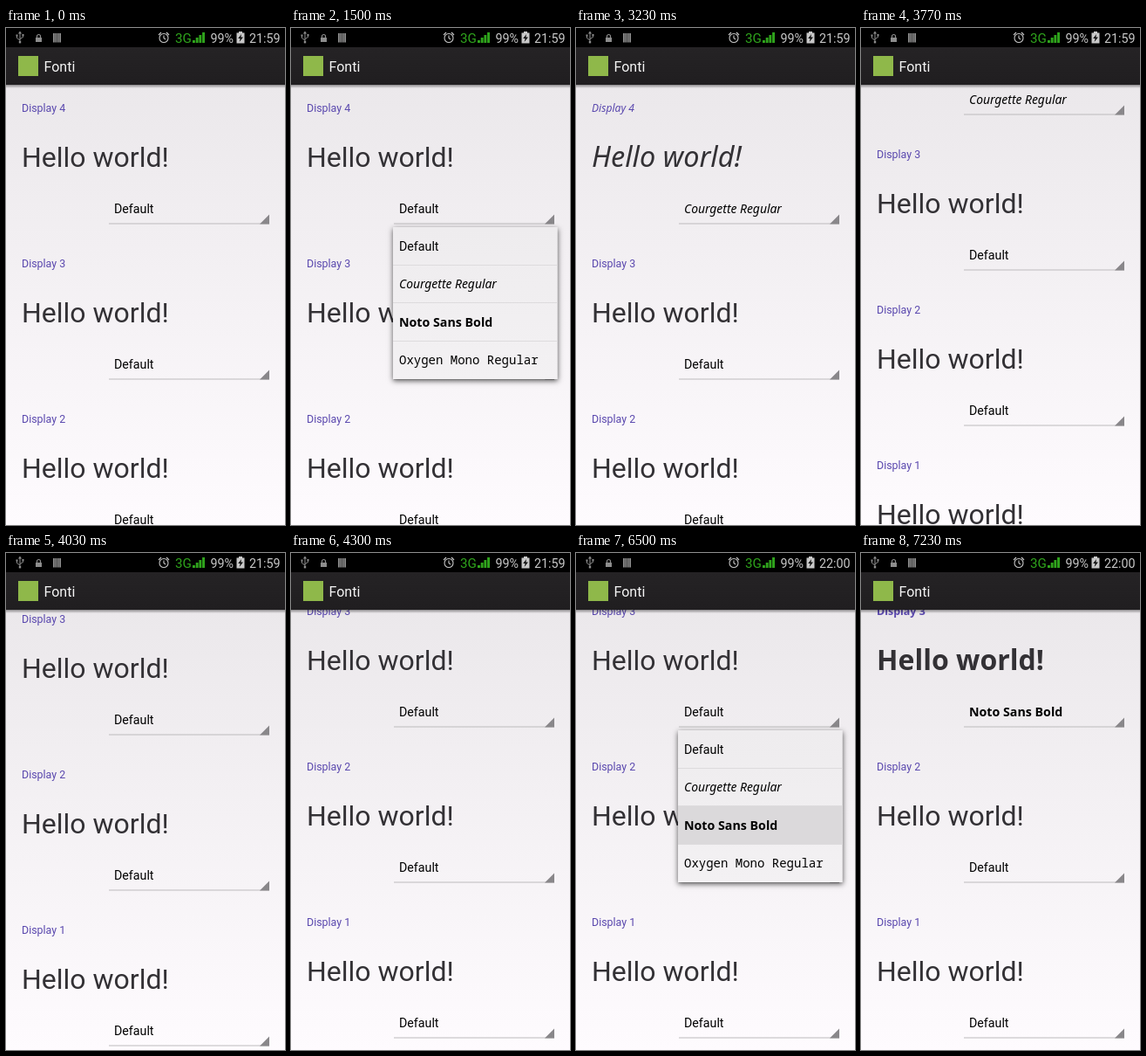
An HTML page with a canvas that plays this animation: 320x569 px, repeating every 8 s.

```html
<!DOCTYPE html>
<html lang="en">
<head>
<meta charset="utf-8">
<title>Font picker</title>
<style>
html, body { margin: 0; width: 100%; height: 100%; overflow: hidden; background: #000; }
canvas { display: block; width: 320px; height: 569px; }
</style>
</head>
<body>
<canvas id="stage" width="320" height="569"></canvas>
<script>
const ctx = document.getElementById('stage').getContext('2d');
const W = 320, H = 569, LOOP = 8000, STEP = 1000 / 15;
const BAR_TOP = 22, BODY_TOP = 65, CARD = 178, ROW = 43.5;
const ROBOTO = 'Roboto, "Noto Sans", sans-serif';

// css: style + weight, k: size factor, dy: baseline shift of the big line
const FONTS = {
  plain:  { name: 'Default', css: '400', family: ROBOTO, k: 1, dy: 0 },
  script: { name: 'Courgette Regular', css: 'italic 500', family: 'Courgette, "Noto Sans", sans-serif', k: 0.975, dy: -2 },
  bold:   { name: 'Noto Sans Bold', css: '700', family: '"Noto Sans", sans-serif', k: 1, dy: 0 },
  mono:   { name: 'Oxygen Mono Regular', css: '400', family: '"Oxygen Mono", "Noto Sans Mono", monospace', k: 0.985, dy: 0 }
};
const CHOICES = ['plain', 'script', 'bold', 'mono'];

// one pick per entry: which card, which row, and when
const PICKS = [
  { card: 0, row: 1, touch: 1030, open: 1167, press: 2367, close: 2567, apply: 3100 },
  { card: 1, row: 2, touch: 4500, open: 4637, press: 6500, close: 6567, apply: 7100 }
];

const clamp = v => Math.max(0, Math.min(1, v));
const easeOut = (p, k) => 1 - Math.pow(1 - clamp(p), k);

function text(s, x, y, size, color, f = FONTS.plain) {
  ctx.font = `${f.css} ${size * f.k}px ${f.family}`;
  ctx.fillStyle = color;
  ctx.fillText(s, x, y);
}

function rect(x, y, w, h, color) {
  ctx.fillStyle = color;
  ctx.fillRect(x, y, w, h);
}

function poly(points, color) {
  ctx.beginPath();
  points.forEach(([x, y]) => ctx.lineTo(x, y));
  ctx.closePath();
  ctx.fillStyle = color;
  ctx.fill();
}

function stroke(path, color, width = 1) {
  ctx.strokeStyle = color;
  ctx.lineWidth = width;
  ctx.stroke(new Path2D(path));
}

function fade(y0, y1, a, b) {
  const g = ctx.createLinearGradient(0, y0, 0, y1);
  g.addColorStop(0, a);
  g.addColorStop(1, b);
  return g;
}

function drawCard(i, scroll, t) {
  const y = i * CARD - scroll;
  const pick = PICKS.find(p => p.card === i);
  const font = FONTS[pick && t >= pick.apply ? CHOICES[pick.row] : 'plain'];
  text('Display ' + (4 - i), 18, y + 95.5, 12.44, '#5a48ae', font);
  text('Hello world!', 18, y + 159, 32, '#333135', font.dy ? { ...font, k: font.k * 1.04 } : font);
  if (pick && t >= pick.touch && t < pick.open + 60) {
    rect(115, y + 187, 189, 39, 'rgba(110,110,110,0.16)');
  }
  text(font.name, 124, y + 212, 14.22, '#000', font);
  rect(118, y + 223.5, 184, 1, '#bdbbbe');
  poly([[302, y + 213.5], [302, y + 224.5], [291, y + 224.5]], '#89878a');
}

function drawPopup(pick, scroll, t) {
  const open = easeOut((t - pick.open) / 300, 2.5) * (1 - clamp((t - pick.close) / 250));
  if (open <= 0) return;
  const top = 228 + pick.card * CARD - scroll, h = ROW * 4;
  ctx.save();
  ctx.globalAlpha = open;
  ctx.translate(0, top);
  ctx.scale(1, 0.3 + 0.7 * open);
  ctx.shadowColor = 'rgba(0,0,0,0.65)';
  ctx.shadowBlur = 6;
  ctx.shadowOffsetY = 1.5;
  rect(117, 0, 188.5, h, '#f0eef0');
  ctx.shadowColor = 'transparent';
  rect(117, 0, 188.5, h, fade(0, h, '#eeecee', '#f3f1f3'));
  CHOICES.forEach((key, i) => {
    const y = i * ROW;
    if (i === pick.row && t >= pick.press) rect(117, y, 188.5, ROW, '#dbd9db');
    if (i) rect(117, Math.round(y) - 1, 188.5, 1, '#dddbdd');
    text(FONTS[key].name, 124, y + 26.5, 14.22, '#000', FONTS[key]);
  });
  ctx.restore();
}

function drawStatus(t) {
  rect(0, 0, W, BAR_TOP, '#000');
  const grey = '#8d8d8d', pale = '#c8c8c8', green = '#2fa41c';

  // usb plug
  stroke('M16 5V16M16 14L12.5 11.5V9M16 12.5L19.5 10.5V8', grey);
  poly([[14, 6.5], [16, 3.5], [18, 6.5]], grey);
  rect(11.5, 7.5, 2, 2, grey);
  rect(18.5, 7, 2, 2, grey);
  rect(14.8, 15, 2.4, 2.4, grey);

  // lock
  rect(34, 11, 7, 5, grey);
  stroke('M35.5 11V9.5a2 2 0 0 1 4 0V11', grey, 1.2);

  for (let i = 0; i < 4; i++) rect(54 + i * 2.4, 6, 1.8, 10.5, grey);

  // alarm
  stroke('M186 11.5a5 5 0 1 1-10 0a5 5 0 1 1 10 0M181 8.5V11.5L183 13M175 8L178 5M187 8L184 5', pale, 1.1);

  text('3G', 194, 17, 15.2, green);
  for (let i = 0; i < 4; i++) rect(214 + i * 3.7, 14 - i * 3, 2.9, 3 + i * 3, green);
  text('99%', 234.5, 16.5, 14.3, pale);

  // battery with bolt
  rect(267, 4, 4, 2, pale);
  rect(264.5, 5.5, 9, 12, pale);
  poly([[270, 7], [266.2, 12], [268.6, 12], [267.6, 16], [272, 10.5], [269.4, 10.5]], '#111');

  text(t < 5830 ? '21:59' : '22:00', 279, 16.5, 14.3, pale);
}

function drawHeader() {
  rect(0, BAR_TOP, W, BODY_TOP - BAR_TOP, fade(BAR_TOP, BODY_TOP, '#252325', '#201e20'));
  rect(0, BODY_TOP, W, 4, fade(BODY_TOP, BODY_TOP + 4, 'rgba(0,0,0,0.4)', 'rgba(0,0,0,0)'));
  rect(14, 32, 23, 23, '#8fb84a');
  text('Fonti', 43.5, 49.5, 16, '#f4f4f4');
}

function draw(t) {
  const scroll = Math.round(203 * easeOut((t - 3575) / 725, 3.1));
  rect(0, 0, W, H, fade(BODY_TOP, H, '#ebe8eb', '#fefbfe'));
  for (let i = 0; i < 4; i++) drawCard(i, scroll, t);
  PICKS.forEach(p => drawPopup(p, scroll, t));
  drawHeader();
  drawStatus(t);
}

// the screen refreshes 15 times a second
function tick() {
  const t = performance.now() % LOOP;
  draw(Math.floor((t - STEP / 2 + 5) / STEP) * STEP + STEP / 2 + 1);
  requestAnimationFrame(tick);
}
tick();
</script>
</body>
</html>
```
